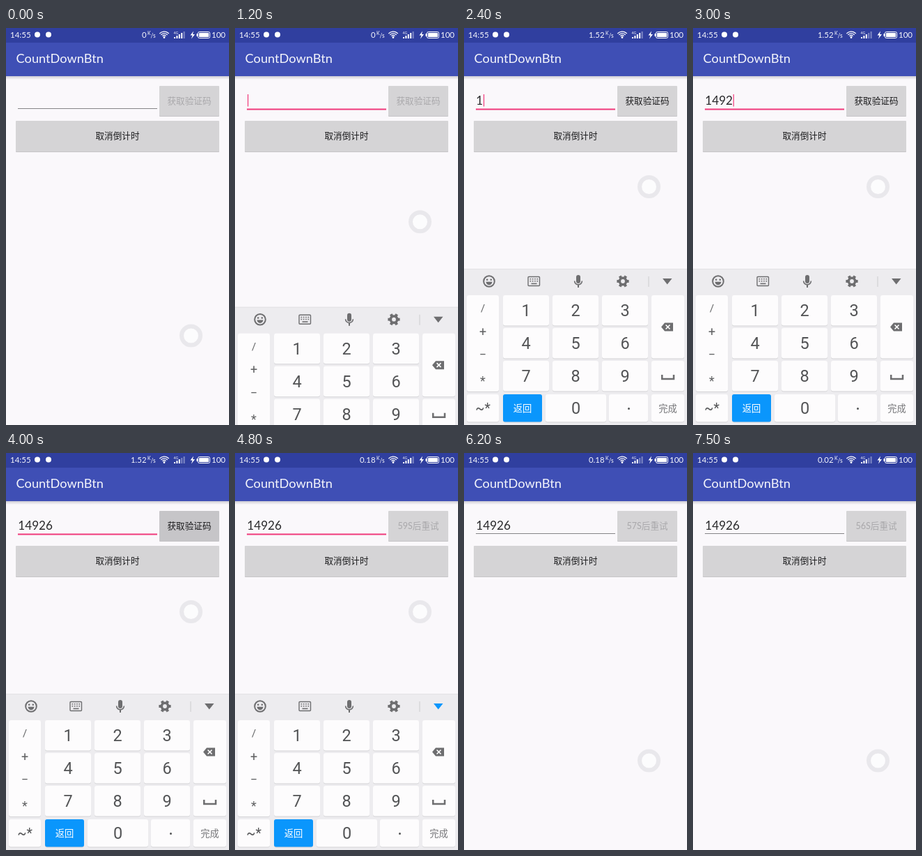
An HTML page with a canvas for the animation above (8000 ms loop, 320x569 px).

```html
<!DOCTYPE html>
<html lang="zh">
<head>
<meta charset="utf-8">
<title>CountDownBtn</title>
<style>
html, body { margin: 0; height: 100%; overflow: hidden; background: #faf8fb; }
canvas { display: block; width: 320px; height: 569px; }
</style>
</head>
<body>
<canvas id="stage"></canvas>
<script>
const LOOP = 8000, STEP = 100, W = 320, H = 569;
const FONT = 'Lato, "Noto Sans CJK SC", "Noto Sans CJK", sans-serif';
const KEY_FONT = 'Roboto, "Noto Sans CJK SC", "Noto Sans CJK", sans-serif';
const PAGE = '#faf8fb', KEY = '#fdfcfd', KEY_TEXT = '#535456';
const PINK = '#f03a7b', ICON = '#6e6e70', BLUE = '#0a96fc';
const NUMBER = '14926', TYPED_AT = [1800, 2600, 2800, 3000, 3300];

const canvas = document.getElementById('stage');
const ctx = canvas.getContext('2d');
const ratio = window.devicePixelRatio || 1;
canvas.width = W * ratio;
canvas.height = H * ratio;

// Latest value of a [time, value] list
const at = (list, t) => list.reduce((value, [time, next]) => t >= time ? next : value, list[0][1]);
const easeOut = (t, start, length) => 1 - (1 - Math.min(1, Math.max(0, (t - start) / length))) ** 3;

function box(x, y, x2, y2, color, radius = 0) {
  ctx.fillStyle = color;
  ctx.beginPath();
  ctx.roundRect(x, y, x2 - x, y2 - y, radius);
  ctx.fill();
}

function text(str, x, y, size, color, align = 'left', family = FONT) {
  ctx.font = `${size}px ${family}`;
  ctx.fillStyle = color;
  ctx.textAlign = align;
  ctx.fillText(str, x, y);
}

function circle(x, y, r, color, width) {
  ctx.beginPath();
  ctx.arc(x, y, r, 0, 2 * Math.PI);
  paint(color, width);
}

function shape(points, color, width) {
  ctx.beginPath();
  points.forEach(([x, y]) => ctx.lineTo(x, y));
  if (!width) ctx.closePath();
  paint(color, width);
}

function paint(color, width) {
  ctx.fillStyle = ctx.strokeStyle = color;
  ctx.lineWidth = width || 1;
  width ? ctx.stroke() : ctx.fill();
}

function statusBar(t) {
  box(0, 0, W, 21, '#303f9f');
  text('14:55', 6, 14, 11.5, '#f4f5fb');
  circle(45, 9.5, 4, '#fff');
  circle(61, 9.5, 4, '#fff');

  text(at([[0, '0'], [1500, '1.52'], [4500, '0.18'], [7500, '0.02']], t), 201.5, 14, 11.4, '#f4f5fb', 'right');
  text('K', 203, 10, 7, '#fff');
  text('/s', 207.5, 14, 8.5, '#fff');

  for (const r of [3.5, 6.2, 8.9]) {
    ctx.beginPath();
    ctx.arc(227, 14, r, -Math.PI * 0.77, -Math.PI * 0.23);
    paint('#fff', 1.3);
  }
  circle(227, 13.5, 1.4, '#fff');

  text('4G', 240.5, 8.5, 5, '#fff');
  const lit = at([[0, 4], [2500, 3], [4500, 4], [5000, 3]], t);
  for (let i = 0; i < 5; i++)
    box(241 + i * 3.4, 13 - i * 2, 243 + i * 3.4, 15, i < lit ? '#fff' : '#7f89c5');

  shape([[269, 4.5], [264.5, 10.5], [267.5, 10.5], [266, 15.5], [271, 9], [268, 9]], '#fff');
  ctx.beginPath();
  ctx.roundRect(275.5, 5.5, 17, 9, 2);
  paint('#fff', 1);
  box(277, 7, 291, 13, '#fff', 0.5);
  box(273.5, 8, 275, 12, '#fff');
  text('100', 295, 14, 11.5, '#f4f5fb');
}

function button(x, y, x2, y2, label, color, fill = '#d5d4d6') {
  box(x, y + 1, x2, y2 + 0.5, '#c6c5c8', 1);
  box(x, y, x2, y2 - 0.5, fill, 1);
  text(label, (x + x2) / 2, (y + y2) / 2 + 4.2, 12.6, color, 'center');
}

function form(t) {
  const focused = t >= 700 && t < 5100;
  const value = NUMBER.slice(0, TYPED_AT.filter(time => t >= time).length);
  const cursor = at([[0, 0], [800, 1], [1300, 0], [1800, 1], [3800, 0], [4300, 1], [4800, 0]], t);
  text(value, 17.3, 109.7, 17.1, '#29292b');
  if (cursor) {
    const x = 18 + ctx.measureText(value).width;
    box(x, 95, x + 1.2, 112.5, PINK);
  }
  if (focused) box(17, 115.5, 217, 117.5, PINK);
  else box(17, 115, 217, 116, '#858487');

  const seconds = 59 - Math.floor((t - 4200) / 1000);
  const counting = t >= 4200;
  const enabled = t >= 1800 && !counting;
  button(220, 83, 306, 126.5, counting ? seconds + 'S后重试' : '获取验证码',
    enabled ? '#1b1b1d' : '#a9a8ab', t >= 4000 && t < 4400 ? '#c6c5c8' : undefined);
  button(14, 133, 306, 177.5, '取消倒计时', '#1b1b1d');
}

function key(x, y, x2, y2, label, size = 23.5, pressed = false, fill = KEY, color = KEY_TEXT) {
  box(x, y + 1, x2, y2 + 1, '#d3d3d6', 3);
  box(x, y, x2, y2, pressed ? '#cfcfd3' : fill, 3);
  text(label, (x + x2) / 2, (y + y2) / 2 + size * 0.36, size, color, 'center', KEY_FONT);
}

function toolbar(t) {
  circle(36, 363, 7.8, ICON, 2);
  circle(33.2, 360.8, 1.3, ICON);
  circle(38.8, 360.8, 1.3, ICON);
  ctx.beginPath();
  ctx.arc(36, 363.8, 4.4, 0, Math.PI);
  paint(ICON);

  ctx.beginPath();
  ctx.roundRect(92, 356.5, 16.5, 13, 1);
  paint(ICON, 1.4);
  for (let i = 0; i < 8; i++) {
    const x = 94.5 + i % 4 * 3.3, y = 359 + Math.floor(i / 4) * 3;
    box(x, y, x + 1.7, y + 1.6, ICON);
  }
  box(96.5, 365.6, 104.5, 367.2, ICON);

  box(161, 354, 167, 366, ICON, 3);
  ctx.beginPath();
  ctx.arc(164, 362.5, 5.4, 0, Math.PI);
  paint(ICON, 1.6);
  box(163, 368, 165, 372, ICON);

  for (let i = 0; i < 6; i++) {
    const a = i * Math.PI / 3, dx = Math.cos(a), dy = Math.sin(a);
    shape([[228 + 5 * dx, 363 + 5 * dy], [228 + 8.6 * dx, 363 + 8.6 * dy]], ICON, 4);
  }
  circle(228, 363, 4.7, ICON, 3.6);

  box(264.5, 356, 265.5, 371, '#cbcbce');
  shape([[285, 359], [298.5, 359], [291.7, 367.5]], t >= 4800 ? BLUE : ICON);
}

function keyboard(t) {
  box(0, 345, W, 800, '#edecef');
  box(0, 345, W, 346, '#e3e2e5');
  toolbar(t);

  // Each press lasts one step and ends when its digit appears
  const index = TYPED_AT.findIndex((time, i) => i > 0 && t >= time - STEP && t < time);
  const pressed = Number(NUMBER[index]);

  key(4, 383, 50, 521, '');
  ['/', '+', '−', '*'].forEach((sign, i) =>
    text(sign, 27, 407 + i * 33.7 + (sign === '*' ? 4 : 0), i ? 18 : 15, '#626365', 'center', KEY_FONT));
  for (let n = 1; n <= 9; n++) {
    const x = 56 + (n - 1) % 3 * 71, y = 383 + Math.floor((n - 1) / 3) * 47;
    key(x, y, x + 66, y + 43.5, n, 23.5, n === pressed);
  }

  key(269, 383, 316, 473.5, '');
  shape([[283, 428.5], [288, 422.5], [300, 422.5], [300, 434.5], [288, 434.5]], ICON);
  shape([[289.5, 425.5], [295.5, 431.5]], '#fff', 1.6);
  shape([[295.5, 425.5], [289.5, 431.5]], '#fff', 1.6);
  key(269, 477, 316, 520.5, '');
  shape([[284.2, 497], [284.2, 503], [301, 503], [301, 497]], ICON, 2.5);

  key(4, 525, 50, 564.5, '~*', 19.5);
  key(56, 525, 112, 564.5, '返回', 13.3, false, BLUE, '#fff');
  key(117, 525, 204, 564.5, '0');
  key(208, 525, 264, 564.5, '');
  circle(236.5, 545.5, 1.5, KEY_TEXT);
  key(269, 525, 316, 564.5, '完成', 13.3, false, KEY, '#77777a');
}

function draw(t) {
  ctx.setTransform(ratio, 0, 0, ratio, 0, 0);
  box(0, 0, W, H, PAGE);

  const shadow = ctx.createLinearGradient(0, 69, 0, 74);
  shadow.addColorStop(0, '#cdccd4');
  shadow.addColorStop(1, PAGE);
  box(0, 69, W, 74, shadow);
  box(0, 21, W, 69, '#3f4fb5');
  text('CountDownBtn', 14.6, 50, 18.2, '#f4f5fb');
  statusBar(t);
  form(t);

  const shown = easeOut(t, 1050, 400) - easeOut(t, 4850, 450);
  if (shown > 0) {
    ctx.save();
    ctx.translate(0, 224 * (1 - shown));
    keyboard(t);
    ctx.restore();
  }

  const lift = easeOut(t, 1050, 400) * (t < 1600 ? 216 : 213.5) - easeOut(t, 4850, 750) * 213.5;
  circle(265.5, 441 - lift, 10.5, 'rgba(253, 253, 254, 0.8)');
  circle(265.5, 441 - lift, 13.5, 'rgba(232, 231, 234, 0.9)', 6);
}

function frame(now) {
  draw(Math.floor(now % LOOP / STEP) * STEP);
  requestAnimationFrame(frame);
}
requestAnimationFrame(frame);
</script>
</body>
</html>
```
